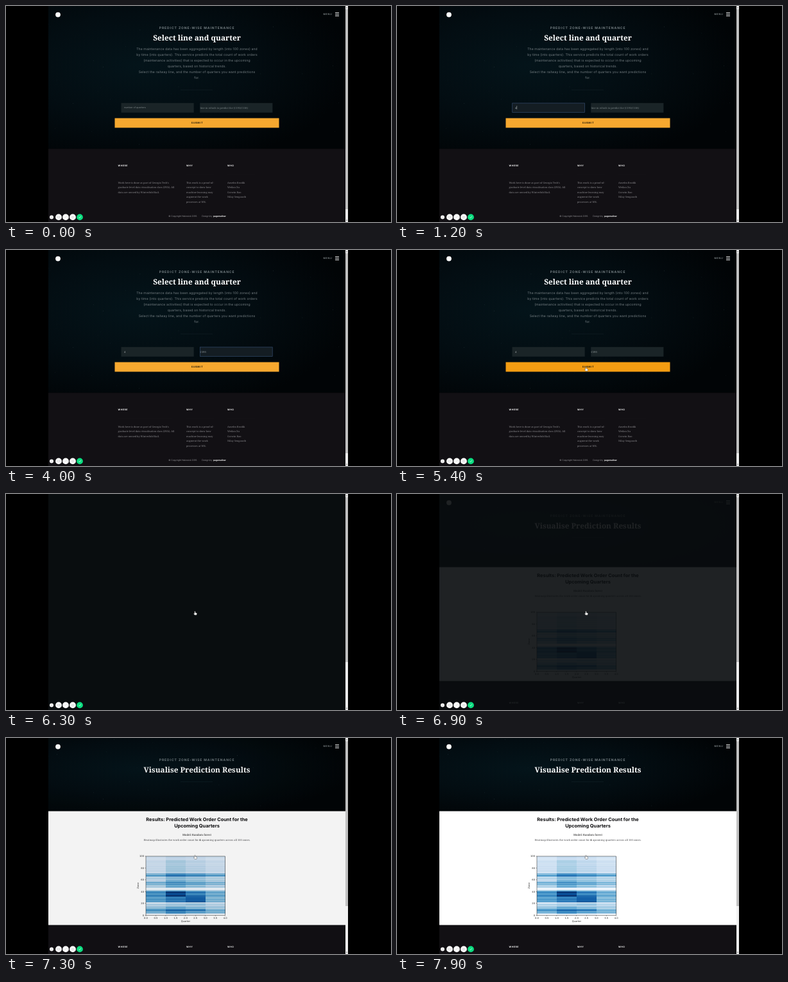
These frames come from a looping animation (600x338 px, 8 s). An HTML page:

```html
<!DOCTYPE html>
<html lang="en">
<head>
<meta charset="utf-8">
<title>Maintenance prediction</title>
<style>
  html, body { margin: 0; width: 100%; height: 100%; overflow: hidden; background: #000; }
  svg { display: block; width: 100vw; height: 100vh; }
  text { text-rendering: geometricPrecision; white-space: pre; }
  .sans { font-family: Inter, "Open Sans", sans-serif; }
  .serif { font-family: "Noto Serif", serif; }
  .plot { font-family: "DejaVu Sans", sans-serif; }
</style>
</head>
<body>
<svg id="stage" viewBox="0 0 600 338">
  <defs>
    <radialGradient id="night" cx=".3" cy=".42" r=".72">
      <stop offset="0" stop-color="#04141a"/>
      <stop offset=".5" stop-color="#030d12"/>
      <stop offset="1" stop-color="#010406"/>
    </radialGradient>
    <clipPath id="view"><rect x="66" width="463" height="338"/></clipPath>
  </defs>
  <rect width="600" height="338"/>
  <g clip-path="url(#view)">
    <g id="formPage"></g>
    <g id="resultPage"></g>
    <rect id="veil" x="66" width="464" height="338" fill="#090d0f"/>
  </g>
  <g id="chrome"></g>
  <g id="cursor">
    <path id="arrow" d="M0 0V6L1.4 4.7L2.4 6.8L3.3 6.4L2.4 4.4H4.2Z" fill="#fff" stroke="#000" stroke-width=".4"/>
    <path id="hand" d="M-.8 -2.2Q0 -3 .6 -2.2V-.3L2.6 .3Q3.2 .6 3 1.6L2.4 3.4H-.6L-2.2 1.2Q-2.1 .3 -.8 .9Z" fill="#fff" stroke="#222" stroke-width=".4"/>
  </g>
</svg>
<script>
const LOOP = 8000;
const SVG = "http://www.w3.org/2000/svg";
const $ = id => document.getElementById(id);
const clamp = x => Math.max(0, Math.min(1, x));
const ramp = (t, from, length) => clamp((t - from) / length);
const swing = p => 0.5 - Math.cos(p * Math.PI) / 2;
const mix = (a, b, p) => a + (b - a) * p;
const blend = (a, b, p) => `rgb(${a.map((v, i) => Math.round(mix(v, b[i], p)))})`;
const show = (node, on) => node.setAttribute("visibility", on ? "inherit" : "hidden");

function seeded(seed) {
  return () => (seed = (seed * 16807) % 2147483647) / 2147483647;
}

function add(parent, tag, attrs) {
  const node = document.createElementNS(SVG, tag);
  for (const key in attrs) node.setAttribute(key, attrs[key]);
  return parent.appendChild(node);
}

const rect = (parent, x, y, width, height, fill, more) =>
  add(parent, "rect", { x, y, width, height, fill, ...more });

function label(parent, family, str, x, y, size, fill, more) {
  const node = add(parent, "text", { class: family, x, y, "font-size": size, fill, ...more });
  node.textContent = str;
  return node;
}

const MID = { "text-anchor": "middle" };
const caps = (spacing, more) => ({ "font-weight": 700, "letter-spacing": spacing, ...more });

function drawHero(page, height, title) {
  rect(page, 66, 0, 464, height, "url(#night)");
  const rnd = seeded(77);
  for (let i = 0; i < 55; i++) {
    const cx = 66 + rnd() * 463, cy = rnd() * 223, r = 0.2 + rnd() * 0.3;
    if (cy < height) add(page, "circle", { cx, cy, r, fill: "#6f8d94", opacity: 0.15 + rnd() * 0.3 });
  }
  add(page, "circle", { cx: 81, cy: 13.6, r: 3.9, fill: "#fff" });
  label(page, "sans", "MENU", 494.5, 13.9, 3.7, "#9aa1a3", { "font-weight": 500, "letter-spacing": 0.7 });
  for (const y of [10.2, 12.6, 15]) rect(page, 513, y, 6, 0.9, "#fff");
  label(page, "sans", "PREDICT ZONE-WISE MAINTENANCE", 297.6, 35.8, 5, "#778185", caps(0.92, MID));
  label(page, "serif", title, 297.5, 53.6, 11.8, "#fff", { "font-weight": 700, ...MID });
}

function drawHeads(page, y) {
  const heads = { WHERE: 174.5, WHY: 281, WHO: 345 };
  for (const name in heads) label(page, "sans", name, heads[name], y, 3.5, "#fff", caps(0.55));
}

function drawColumn(page, x, lines) {
  lines.forEach((line, i) => label(page, "serif", line, x, 277.6 + i * 7.5, 3.87, "#88878b"));
}

function makeField(page, x) {
  return {
    box: rect(page, x, 151.8, 113.2, 15, "#1a2427"),
    ring: rect(page, x + 0.2, 152, 112.8, 14.6, "none", { stroke: "#31496a", "stroke-width": 0.7 }),
    caret: rect(page, 0, 156.2, 0.5, 5.4, "#c8cfd0")
  };
}

// Form page
const form = $("formPage");
drawHero(form, 223.5, "Select line and quarter");
[
  "The maintenance data has been aggregated by length (into 100 zones) and",
  "by time (into quarters). This service predicts the total count of work orders",
  "(maintenance activities) that is expected to occur in the upcoming",
  "quarters, based on historical trends.",
  "Select the railway line, and the number of quarters you want predictions",
  "for."
].forEach((line, i) =>
  label(form, "sans", line, 297.5, 69.2 + i * 8.95, 5.1, "#767f83", { "letter-spacing": 0.12, ...MID }));
rect(form, 272, 130.9, 50, 0.5, "#15242a");
const fieldA = makeField(form, 179.5);
const fieldB = makeField(form, 302.2);
const hintA = label(form, "sans", "number of quarters", 184, 160.4, 3.7, "#7d8688");
const hintB = label(form, "serif", "line in which to predict for (C193/C138)", 302.5, 160.6, 4, "#788284");
const valueA = label(form, "sans", "4", 184, 160.5, 3.8, "#b4babb");
const valueB = label(form, "serif", "", 302.5, 160.6, 4, "#9ba4a5");
const button = rect(form, 169.5, 175.5, 256, 15, "#f6a82f");
label(form, "sans", "SUBMIT", 298, 184.3, 3.6, "#141008", caps(0.75, MID));

rect(form, 66, 223.5, 464, 115, "#121014");
drawHeads(form, 251.2);
for (const x of [174.5, 281, 345]) rect(form, x, 263, x < 200 ? 85 : 42, 0.4, "#17151a");
drawColumn(form, 174.5, [
  "Work here is done as part of Georgia Tech's",
  "graduate level data visualisation class (DVA). All",
  "data are owned by Winterfold Rail."
]);
drawColumn(form, 281, [
  "This work is a proof-of-", "concept to show how", "machine learning may",
  "augment the work", "processes at WR."
]);
drawColumn(form, 345, ["Anselm Brodik", "Weilan Xu", "Corwin Bao", "Nilay Sengarath"]);
label(form, "sans", "© Copyright Halowick 2016.", 253.3, 330.1, 3.4, "#98979b");
label(form, "sans", "Design by", 305.3, 330.1, 3.4, "#98979b");
label(form, "sans", "pagemallow", 323, 330.1, 3.3, "#fff", { "font-weight": 700 });

// Result page
const result = $("resultPage");
drawHero(result, 114.5, "Visualise Prediction Results");
rect(result, 272, 68, 50, 0.5, "#15242a");
rect(result, 66, 114.5, 464, 178.3, "#fff");
const bold = { "font-weight": 700, ...MID };
label(result, "sans", "Results: Predicted Work Order Count for the", 297.5, 130, 7.4, "#0b0b0d", bold);
label(result, "sans", "Upcoming Quarters", 297.5, 140, 7.4, "#0b0b0d", bold);
label(result, "serif", "Model: Random forest", 297.5, 153.4, 4.25, "#151515", MID);
const note = label(result, "serif", "Heatmap illustrates the work order count for ", 297.5, 160.8, 4, "#4f4f52", MID);
add(note, "tspan", { "font-weight": 700, fill: "#111" }).textContent = "4";
add(note, "tspan", {}).textContent = " upcoming quarters across all 100 zones.";
rect(result, 66, 292.8, 464, 46, "#121014");
drawHeads(result, 328.2);

// Heatmap: upper zone of each band, level per quarter
const BANDS = [
  [3, .15, .2, .18, .15], [7, .45, .62, .5, .42], [10, .7, .85, .78, .58],
  [13, .5, .6, .55, .42], [17, .35, .45, .4, .35], [22, .25, .32, .34, .25],
  [32, .6, .75, .86, .48], [41, .6, .9, .66, .45], [43, .4, .5, .45, .35],
  [47, .06, .08, .07, .05], [58, .42, .58, .5, .4], [65, .25, .42, .36, .28],
  [71, .46, .65, .56, .46], [94, .2, .32, .26, .2], [100, .18, .25, .22, .18]
];
const BLUES = ["f7fbff", "deebf7", "c6dbef", "9ecae1", "6baed6", "4292c6", "2171b5", "08519c", "08306b"]
  .map(hex => [0, 2, 4].map(i => parseInt(hex.slice(i, i + 2), 16)));

function shade(level) {
  const v = clamp(level) * 7.99, i = Math.floor(v);
  return blend(BLUES[i], BLUES[i + 1], v - i);
}

const plot = { x: 218, y: 185, w: 123.6, h: 92.3 };
const cellW = plot.w / 4, cellH = plot.h / 100;
const noise = seeded(2024);
for (let zone = 0; zone < 100; zone++) {
  const band = BANDS.find(b => zone < b[0]);
  const spread = zone >= 71 || band[1] < 0.1 ? 0.07 : 0.28;
  const shift = (noise() - 0.5) * spread;
  for (let q = 0; q < 4; q++) {
    const level = band[q + 1] + shift + (noise() - 0.5) * spread * 0.3;
    rect(result, plot.x + q * cellW, plot.y + (99 - zone) * cellH, cellW, cellH + 0.1,
      shade(level), { "shape-rendering": "crispEdges" });
  }
}
rect(result, plot.x, plot.y, plot.w, plot.h, "none", { stroke: "#222", "stroke-width": 0.5 });
for (let i = 0; i <= 5; i++) {
  const y = plot.y + plot.h * (1 - i / 5);
  rect(result, plot.x - 1.5, y - 0.2, 1.5, 0.4, "#222");
  label(result, "plot", i * 20, 215, y + 1.4, 3.7, "#222", { "text-anchor": "end" });
}
for (let i = 0; i <= 8; i++) {
  const x = plot.x + plot.w * i / 8;
  rect(result, x - 0.2, plot.y + plot.h, 0.4, 1.5, "#222");
  label(result, "plot", (i / 2).toFixed(1), x, 283.2, 3.7, "#222", MID);
}
label(result, "plot", "Quarter", 279.8, 287.9, 3.7, "#222", MID);
label(result, "plot", "Zone", 0, 0, 3.7, "#222", { transform: "translate(206.8 231) rotate(-90)", ...MID });

// Scrollbar and recorder buttons
const chrome = $("chrome");
rect(chrome, 529, 0, 4, 338, "#f1f1f1");
const thumb = rect(chrome, 529, 5, 4, 313, "#c1c1c1");
add(chrome, "path", { d: "M529.9 3.2h2.2l-1.1-1.5zM529.9 334.8h2.2l-1.1 1.5z", fill: "#555" });
[71, 82, 93, 104, 115].forEach((cx, i) =>
  add(chrome, "circle", { cx, cy: 330.4, r: i ? 4.9 : 3, fill: i < 4 ? "#fff" : "#0bdd80" }));
add(chrome, "path", {
  d: "M70.2 329.6l1.6 1.6m0-1.6l-1.6 1.6M80.5 329.1h3v2.6h-3zM91.5 331.7l3-2.8M102.8 329.1h2.4v2.8h-2.4z",
  fill: "none", stroke: "#b0b3b5", "stroke-width": 0.5
});
add(chrome, "path", { d: "M113.4 330.5l1.2 1.2l2.2-2.5", fill: "none", stroke: "#fff", "stroke-width": 0.7 });

// Timeline
const FOCUS_A = 200, TYPED_A = 1200, FOCUS_B = 1900, BLUR_B = 4000, LOAD = 5700, REVEAL = 6785;
const KEYS = [3000, 3200, 3300, 3500];

function setField(field, t, from, to, lastKey, caretX) {
  const glow = ramp(t, from, 300) - ramp(t, to, 300);
  const active = t >= from && t < to;
  field.box.setAttribute("fill", blend([26, 36, 39], [20, 29, 35], glow));
  field.ring.setAttribute("opacity", Math.max(0, glow));
  field.caret.setAttribute("x", caretX);
  show(field.caret, active && (t - lastKey) % 1000 < 500);
}

function render(t) {
  const loaded = t >= LOAD;
  show(form, !loaded);
  show(result, loaded);
  $("veil").setAttribute("opacity", loaded ? 1 - swing(ramp(t, REVEAL, 600)) : 0);
  thumb.setAttribute("height", loaded ? 258 : 313);

  const typedA = t >= TYPED_A;
  show(hintA, !loaded && !typedA);
  show(valueA, !loaded && typedA);
  setField(fieldA, t, FOCUS_A, FOCUS_B, typedA ? TYPED_A : FOCUS_A, typedA ? 186.6 : 184);

  const keys = KEYS.filter(k => t >= k);
  show(hintB, !keys.length);
  valueB.textContent = "C193".slice(0, keys.length);
  const caretB = 302.6 + (keys.length ? valueB.getComputedTextLength() : 0);
  setField(fieldB, t, FOCUS_B, BLUR_B, keys.length ? keys[keys.length - 1] : FOCUS_B, caretB);

  const go = swing(ramp(t, 4500, 700));
  const x = t < 5400 ? mix(318, 297, go) : 294.6;
  const y = mix(165, 186, go);
  const over = y > 175.5;
  $("cursor").setAttribute("transform", `translate(${x} ${y})`);
  show($("cursor"), t >= 4500);
  show($("arrow"), !over);
  show($("hand"), over);
  button.setAttribute("fill", blend([246, 168, 47], [243, 156, 18], ramp(t, 4850, 300)));
}

function tick(now) {
  render(now % LOOP);
  requestAnimationFrame(tick);
}
render(0);
requestAnimationFrame(tick);
</script>
</body>
</html>
```
